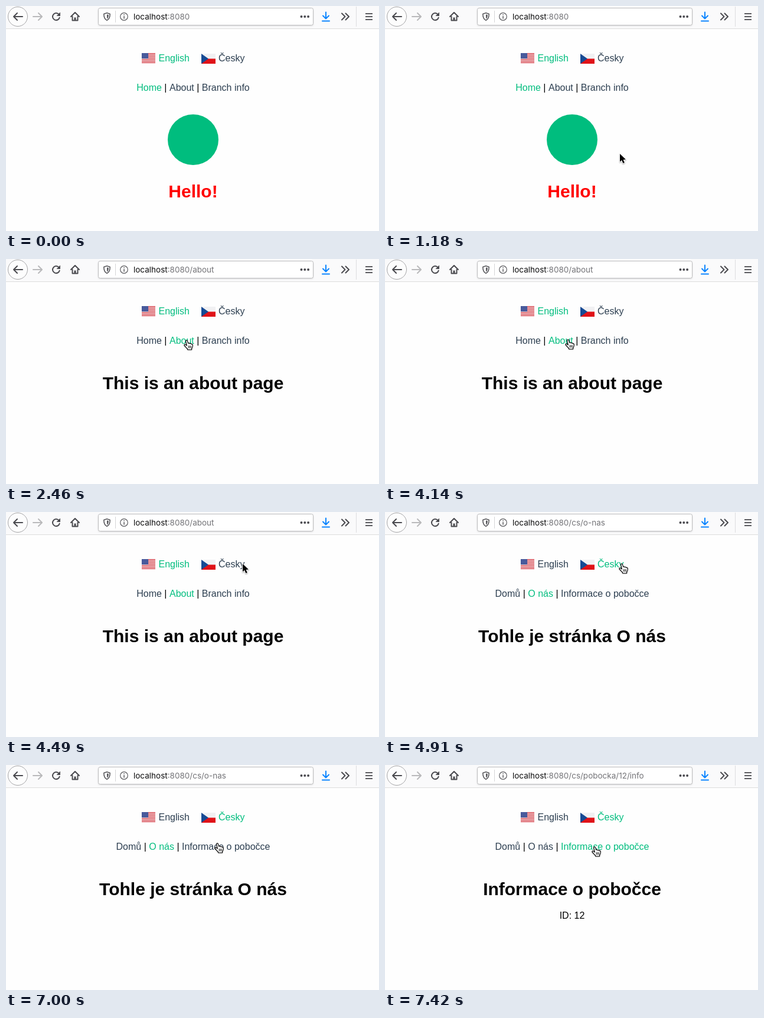
An HTML page with a canvas for the animation above (8000 ms loop, 632x382 px).

```html
<!DOCTYPE html>
<html lang="en">
<head>
<meta charset="utf-8">
<title>Localized routes</title>
<style>
html, body { margin: 0; width: 100%; height: 100%; overflow: hidden; background: #fefefe; }
canvas { display: block; width: 632px; height: 382px; }
</style>
</head>
<body>
<canvas id="stage"></canvas>
<script>
const W = 632, H = 382, LOOP = 8000, CENTER = 317;
const GREEN = '#00bd7e', NAVY = '#2c3e50', ICON = '#4a4a4f';
const SANS = '"Liberation Sans", Arial, sans-serif';
const UI = 'Inter, Roboto, sans-serif';

const canvas = document.getElementById('stage');
const ctx = canvas.getContext('2d');
const dpr = window.devicePixelRatio || 1;
canvas.width = W * dpr;
canvas.height = H * dpr;

const EN = ['Home', 'About', 'Branch info'];
const CS = ['Domů', 'O nás', 'Informace o pobočce'];
const pages = [
  { from: 0, path: '', nav: EN, active: 0, lang: 0, home: true },
  { from: 2400, path: '/about', nav: EN, active: 1, lang: 0, title: 'This is an about page' },
  { from: 4910, path: '/cs/o-nas', nav: CS, active: 1, lang: 1, title: 'Tohle je stránka O nás' },
  { from: 7420, path: '/cs/pobocka/12/info', nav: CS, active: 2, lang: 1,
    title: 'Informace o pobočce', note: 'ID: 12' }
];

// Pointer trips: each key is [time, x, y]; moves land on discrete steps.
const trips = [
  { steps: 19, keys: [[780, 505, 378], [1180, 398, 250], [1580, 324, 169], [1860, 306, 138]] },
  { steps: 6, keys: [[4140, 310, 137], [4315, 362, 108], [4490, 401, 88]] },
  { steps: 7, keys: [[6650, 394, 93], [6850, 368, 117], [7060, 355, 139]] }
];

function text(str, x, y, font, color, align = 'left') {
  ctx.font = font;
  ctx.fillStyle = color;
  ctx.textAlign = align;
  ctx.fillText(str, x, y);
  return ctx.measureText(str).width;
}

function rect(x, y, w, h, color) {
  ctx.fillStyle = color;
  ctx.fillRect(x, y, w, h);
}

function line(d, color = ICON, width = 2) {
  ctx.strokeStyle = color;
  ctx.lineWidth = width;
  ctx.stroke(new Path2D(d));
}

function fill(d, color) {
  ctx.fillStyle = color;
  ctx.fill(new Path2D(d));
}

function disc(x, y, r, color) {
  ctx.fillStyle = color;
  ctx.beginPath();
  ctx.arc(x, y, r, 0, Math.PI * 2);
  ctx.fill();
}

function ring(x, y, r, color, width) {
  ctx.strokeStyle = color;
  ctx.lineWidth = width;
  ctx.beginPath();
  ctx.arc(x, y, r, 0, Math.PI * 2);
  ctx.stroke();
}

function toolbar(path) {
  rect(0, 0, W, 38, '#fafafb');
  rect(0, 38, W, 1, '#dcdcdd');
  ctx.lineCap = ctx.lineJoin = 'round';

  disc(20, 18, 16.5, '#fdfdfd');
  ring(20, 18, 16.5, '#a5a5a7', 1);
  line('M28 18H13M19 12L13 18L19 24');
  line('M46 18H60M55 12L61 18L55 24', '#b9b9bb');
  line('M89.6 14.2A6 6 0 1 0 90.8 19.6');
  fill('M92 10.5V17H85.5Z', ICON);
  line('M110 18L117 11L124 18M112.5 18V24.5H121.5V18');
  rect(115.5, 19.5, 3, 5, ICON);

  ctx.save();
  ctx.shadowColor = 'rgba(0,0,0,.18)';
  ctx.shadowBlur = 3 * dpr;
  ctx.shadowOffsetY = dpr;
  ctx.fillStyle = '#fff';
  ctx.beginPath();
  ctx.roundRect(156.5, 3.5, 364, 29, 3);
  ctx.fill();
  ctx.restore();
  ctx.strokeStyle = '#bdbdbf';
  ctx.lineWidth = 1;
  ctx.stroke();

  line('M171 11.7L176.2 13.4C176.2 19.5 174.8 22.4 171 24.4C167.2 22.4 165.8 19.5 165.8 13.4Z', '#5a5a5e', 1.6);
  fill('M171 14.2L173.9 15.1C173.8 18.8 173 20.6 171 21.9Z', '#5a5a5e');
  rect(185, 8, 1, 20, '#d5d5d7');
  ring(200, 18, 6.3, '#5a5a5e', 1.2);
  rect(199.3, 17, 1.5, 4.6, '#5a5a5e');
  rect(199.3, 14, 1.5, 1.6, '#5a5a5e');

  const font = '13.5px ' + UI;
  const host = text('localhost', 216, 23, font, '#0c0c0d');
  text(':8080' + path, 216 + host, 23, font, '#737377');

  for (let i = 0; i < 3; i++) {
    disc(500.5 + i * 5.8, 18, 2, ICON);
    rect(609, 12.2 + i * 5, 12, 1.8, ICON);
  }
  line('M542 10.5V21M537 16.5L542 21.5L547 16.5M536 25.5H548', '#0a84ff');
  line('M569 12.5L574.5 18L569 23.5M575.5 12.5L581 18L575.5 23.5');
  rect(593, 1, 1, 34, '#dddddf');
}

function usFlag(x, y) {
  const w = 23, h = 17, stripe = h / 13;
  rect(x, y, w, h, '#f4eeee');
  for (let i = 0; i < 13; i += 2) rect(x, y + i * stripe, w, stripe, '#d6343f');
  rect(x, y, 11, stripe * 7, '#33478f');
  for (let r = 0; r < 4; r++) {
    for (let c = 0; c < 5; c++) rect(x + 1 + c * 2, y + 1 + r * 2.1, 0.8, 0.8, '#b9c2e0');
  }
}

function czFlag(x, y) {
  rect(x, y, 24, 17, '#f1f1f3');
  rect(x, y + 8.5, 24, 8.5, '#e01218');
  fill(`M${x} ${y}L${x + 12} ${y + 8.5}L${x} ${y + 17}Z`, '#164a94');
}

function content(page) {
  const body = '16px ' + SANS, head = 'bold 30px ' + SANS;
  usFlag(230, 80);
  czFlag(331, 81);
  ['English', 'Česky'].forEach((name, i) =>
    text(name, i ? 360 : 258.5, 94, body, page.lang === i ? GREEN : NAVY));

  ctx.font = body;
  let x = CENTER - ctx.measureText(page.nav.join(' | ')).width / 2;
  page.nav.forEach((name, i) => {
    if (i) x += text(' | ', x, 144, body, '#000');
    x += text(name, x, 144, body, page.active === i ? GREEN : NAVY);
  });

  if (page.home) {
    disc(CENTER, 227, 43, GREEN);
    text('Hello!', CENTER, 325, head, '#f00', 'center');
  } else {
    text(page.title, CENTER, 221, head, '#000', 'center');
  }
  if (page.note) text(page.note, CENTER, 261, body, '#000', 'center');
}

// Cubic Hermite through the keys, with finite-difference tangents.
function along(keys, t) {
  const last = keys.length - 1;
  let i = 0;
  while (i < last - 1 && t >= keys[i + 1][0]) i++;
  const a = keys[i], b = keys[i + 1], span = b[0] - a[0];
  const u = Math.min(1, (t - a[0]) / span);
  const slope = (k, d) => {
    const p = keys[Math.max(0, k - 1)], q = keys[Math.min(last, k + 1)];
    return (q[d] - p[d]) / (q[0] - p[0]) * span;
  };
  return [1, 2].map(d => {
    const m = slope(i, d), n = slope(i + 1, d), gap = b[d] - a[d];
    return a[d] + u * (m + u * (3 * gap - 2 * m - n + u * (m + n - 2 * gap)));
  });
}

function pointerAt(t) {
  const trip = trips.filter(p => p.keys[0][0] <= t).pop();
  if (!trip) return null;
  const start = trip.keys[0][0], end = trip.keys[trip.keys.length - 1][0];
  const step = (end - start) / trip.steps;
  const n = Math.min(trip.steps, Math.floor((t - start) / step + 0.01));
  return along(trip.keys, start + n * step).map(Math.round);
}

function overLink(x, y, t) {
  if (y > 128 && y < 148) return true;
  return x > 358 && x < 406 && y < 98 && t >= 4670;
}

function arrow() {
  const d = 'M0 0V13.6L3.1 10.8L5.4 16L7.9 14.9L5.6 9.9L9.9 9.6Z';
  ctx.save();
  ctx.shadowColor = 'rgba(0,0,0,.35)';
  ctx.shadowBlur = 2 * dpr;
  ctx.shadowOffsetY = dpr;
  line(d, '#fff', 2);
  ctx.restore();
  fill(d, '#000');
}

function hand() {
  const d = 'M-1.4 1.6C-1.6-.6 1-.8 1.5 1.2L2.6 5.2C3.4 4.3 5 4.6 5.3 5.8' +
    'C6.4 5 7.6 5.4 8 6.6C9.3 6.1 10.2 7 10.3 8.4C10.5 11 9.8 12.4 8.6 14.2' +
    'V16H1.8L1.2 14.2C-.6 12.6-1.8 11-3.8 9C-4.8 7.6-3.2 6.3-1.8 7.4L.3 9Z';
  ctx.save();
  ctx.shadowColor = 'rgba(0,0,0,.3)';
  ctx.shadowBlur = 2 * dpr;
  ctx.shadowOffsetY = dpr;
  fill(d, '#fff');
  ctx.restore();
  line(d, '#000', 1.2);
  line('M3.2 9.5V13M5.2 9.5V13M7.2 9.5V13', '#000', 0.9);
}

function draw(t) {
  const page = pages.filter(p => p.from <= t).pop();
  ctx.setTransform(dpr, 0, 0, dpr, 0, 0);
  rect(0, 0, W, H, '#fefefe');
  toolbar(page.path);
  content(page);

  const spot = pointerAt(t);
  if (!spot) return;
  ctx.translate(spot[0], spot[1]);
  overLink(spot[0], spot[1], t) ? hand() : arrow();
}

const began = performance.now();
function tick() {
  draw((performance.now() - began) % LOOP);
  requestAnimationFrame(tick);
}
tick();
</script>
</body>
</html>
```
